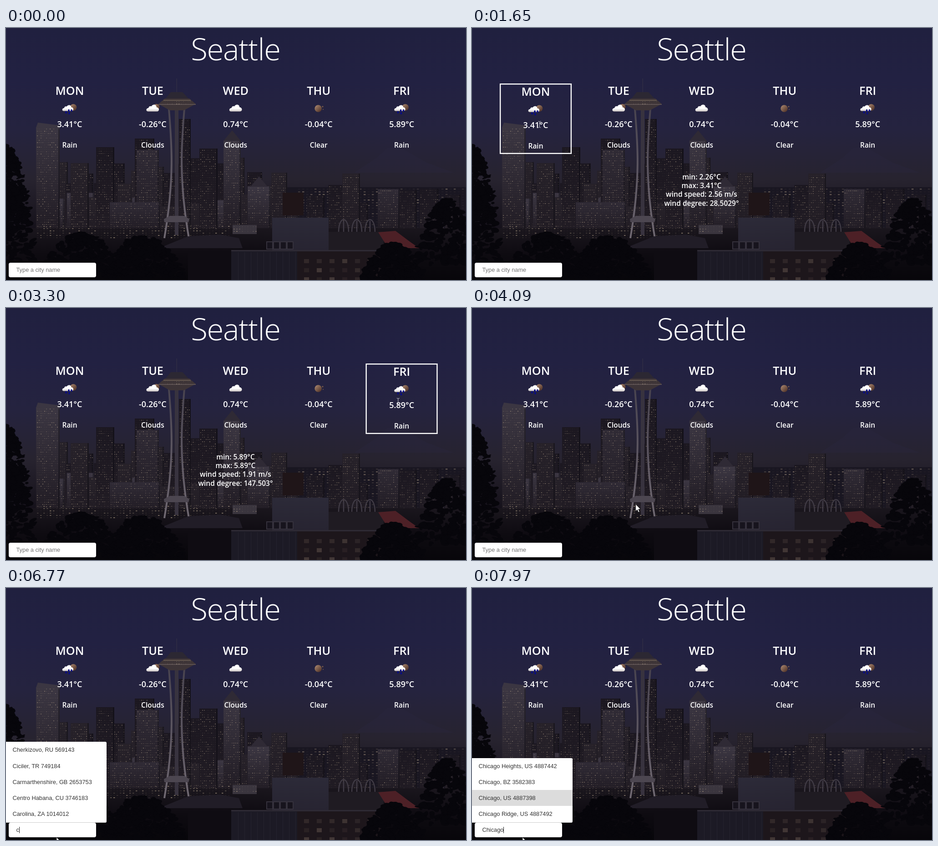
Write an HTML page with a canvas that moves like this. It is 1011 px wide and 554 px high and loops after 8000 ms.

```html
<!DOCTYPE html>
<html lang="en">
<head>
<meta charset="utf-8">
<title>Five day forecast</title>
<style>
html, body { margin: 0; width: 100%; height: 100%; overflow: hidden; background: #1f1f3e; }
#stage { position: relative; width: 1011px; height: 554px; overflow: hidden; }
canvas, svg { position: absolute; left: 0; top: 0; }
svg text { font-family: "Open Sans", "Noto Sans", sans-serif; font-weight: 600; fill: #fff; text-anchor: middle; }
svg .city { font-weight: 300; font-size: 67px; letter-spacing: -1.3px; }
.day { font-size: 25.2px; }
.temp { font-size: 18px; }
.sky, .info { font-size: 15.5px; }
#field, #list { position: absolute; box-sizing: border-box; background: #fff; color: #333;
  font: 12.8px/35.25px "Liberation Sans", Arial, sans-serif; white-space: pre; }
#field { left: 5.5px; top: 515.5px; width: 192px; height: 32px; padding-left: 17px; line-height: 31px; border-radius: 4px; }
#field.empty { color: #757575; }
#caret { position: absolute; width: 1px; height: 14px; top: 9.5px; background: #222; }
#list { left: 0; bottom: 38.5px; min-width: 221px; max-height: 50%; overflow: hidden;
  border-radius: 0 3px 3px 0; border-bottom: 1px solid #ccc; }
#list div { padding: 0 14.5px; height: 35.25px; }
#list .on { background: #dcdcdc; }
</style>
</head>
<body>
<div id="stage">
  <canvas id="photo" width="1011" height="554"></canvas>
  <svg id="ui" width="1011" height="554">
    <defs>
      <linearGradient id="moon" x1="0" y1="0" x2="1" y2="1">
        <stop offset="0" stop-color="#b08d74"/><stop offset="1" stop-color="#46291f"/>
      </linearGradient>
      <linearGradient id="puff" x1="0" y1="0" x2="0" y2="1">
        <stop offset=".55" stop-color="#fff"/><stop offset="1" stop-color="#cfc8c6"/>
      </linearGradient>
      <path id="cloud" fill="url(#puff)" d="M-11 8C-17 8-16 0-10 0C-9-5-5-5-3-4C0-10 9-9 9-2C16-2 17 8 10 8Z"/>
    </defs>
    <text class="city" x="504.5" y="71">Seattle</text>
  </svg>
  <div id="list"></div>
  <div id="field"><span id="value"></span><i id="caret"></i></div>
  <svg width="1011" height="554">
    <path id="arrow" d="M0 0V15.5L3.6 12.2L6 17.8L8.6 16.7L6.2 11.2H11Z" fill="#fff" stroke="#111" stroke-width=".8"/>
    <path id="beam" d="M-3-7Q0-7 0-5.5Q0-7 3-7M0-6V6M-3 7Q0 7 0 5.5Q0 7 3 7" fill="none"/>
  </svg>
</div>
<script>
const LOOP = 8000;
const $ = id => document.getElementById(id);

// ---- city at dusk ----
const g = $('photo').getContext('2d');
let seed = 11;
const rnd = () => (seed = (seed * 16807) % 2147483647) / 2147483647;
const between = (a, b) => a + (b - a) * rnd();
const box = (x, y, w, h, c) => { g.fillStyle = c; g.fillRect(x, y, w, h); };
function poly(c, ...p) {
  g.fillStyle = c;
  g.beginPath();
  for (let i = 0; i < p.length; i += 2) g.lineTo(p[i], p[i + 1]);
  g.fill();
}
function fade(y, h, ...stops) {
  const f = g.createLinearGradient(0, y, 0, y + h);
  stops.forEach((c, i) => f.addColorStop(i / (stops.length - 1), c));
  return f;
}
// mostly dim panes, a few bright ones
function lights(x, y, w, h, dx, dy, rgb = '176,158,134') {
  for (let j = y + 3; j < y + h - 3; j += dy)
    for (let i = x + 2; i < x + w - 2; i += dx)
      box(i, j, dx * .5, dy * .4, `rgba(${rgb},${.03 + .5 * rnd() ** 4})`);
}
const TONES = ['#1b1720', '#262129', '#2f2a35', '#3b3642'];
function tower(x, y, w, tone) {
  const h = 446 - y;
  box(x, y, w, h, fade(y, h, TONES[tone], '#201b23'));
  box(x + w - 3, y, 3, h, 'rgba(8,6,14,.35)');
  lights(x, y, w, h, 4, 5);
}
// leaves gathered below a rounded crown
function tree(cx, top, half, base) {
  g.fillStyle = '#07060b';
  for (let i = 0; i < 320; i++) {
    const v = rnd();
    g.beginPath();
    g.ellipse(cx + between(-half, half) * Math.sqrt(v), top + (base - top) * v, between(3, 11), between(2, 6), between(-.5, .5), 0, 7);
    g.fill();
  }
}

function skyline() {
  for (let x = 105; x < 550; x += between(24, 36)) tower(x, between(285, 345), between(28, 42), 0 | rnd() * 2);
  for (let x = 560; x < 1000; x += between(42, 60)) tower(x, between(345, 385), between(32, 44), 0 | rnd() * 2);
  for (let x = 75; x < 560; x += between(45, 75)) tower(x, between(362, 405), between(40, 62), 1 + 0 | rnd() * 3);
  [[66, 218, 52, 3], [142, 297, 40, 1], [198, 262, 40, 0], [283, 243, 43, 0], [287, 268, 49, 2], [380, 200, 26, 0],
   [425, 265, 40, 0], [478, 247, 38, 3], [531, 348, 50, 3], [583, 318, 35, 1], [739, 320, 39, 1], [817, 354, 48, 2],
   [228, 383, 110, 2]].forEach(t => tower(...t));
  poly(TONES[3], 66, 219, 70, 208, 118, 214, 118, 222);
  for (const [x, y] of [[497, 225], [556, 326]]) poly(TONES[2], x - 19, y + 23, x, y, x + 19, y + 23);
  box(608, 362, 46, 50, '#1f1518');
}

function needle() {
  box(371, 180, 8, 275, '#38333f');
  g.strokeStyle = fade(180, 280, '#49444f', '#5d5762', '#6f6871');
  g.lineWidth = 4;
  for (const s of [-1, 1]) {
    g.beginPath();
    g.moveTo(375 + s * 17, 178);
    g.bezierCurveTo(375 + s * 11, 250, 375 + s * 4, 330, 375 + s * 27, 462);
    g.stroke();
  }
  box(374.5, 111, 1.5, 30, '#302d44');
  poly('#2c2833', 350, 156, 362, 141, 388, 141, 402, 156);
  poly('#3d3437', 335, 167, 349, 155, 403, 155, 417, 167, 391, 181, 360, 181);
  box(346, 158, 60, 2, '#65584f');
  box(335, 167, 82, 2, '#5c5152');
  lights(342, 158, 68, 14, 5, 5);
  poly('#4c4650', 347, 420, 360, 413, 392, 413, 403, 420, 401, 427, 348, 427);
}

function rooftops() {
  box(498, 433, 53, 20, '#3a353e');
  lights(498, 433, 53, 20, 6, 5);
  poly('#211d27', 346, 480, 400, 458, 470, 454, 512, 462, 520, 484, 350, 484);
  g.strokeStyle = '#403b45';
  g.lineWidth = 2.5;
  for (let x = 742; x < 805; x += 29) {
    g.beginPath();
    g.moveTo(x - 11, 449);
    g.bezierCurveTo(x - 11, 412, x + 11, 412, x + 11, 449);
    g.moveTo(x, 449);
    g.lineTo(x, 424);
    g.stroke();
  }
  box(700, 448, 130, 40, '#1f1b22');
  poly('#4d2026', 818, 449, 856, 446, 888, 470, 908, 484, 840, 484);
  box(585, 417, 124, 73, fade(417, 73, '#2c2a38', '#272431'));
  for (let x = 572; x < 630; x += 15) { box(x, 469, 15, 18, '#35313c'); box(x + 2, 471, 11, 14, '#17141d'); }
  box(495, 490, 330, 64, '#1d161b');
  box(495, 490, 145, 64, '#1c1a25');
  for (let x = 510; x < 640; x += 14) box(x, 493, 1, 61, '#25232f');
  box(495, 488, 330, 3, '#2e2a34');
  for (let y = 508; y < 554; y += 20)
    for (let x = 655; x < 820; x += 28) box(x, y, 11, 9, `rgba(150,130,115,${between(.08, .35)})`);
  box(400, 490, 95, 64, '#0f0c12');
}

function paintCity() {
  box(0, 0, 1011, 554, fade(0, 554, '#20203f', '#222142', '#25233f', '#27232f', '#15111a', '#0b080e'));
  poly('rgba(46,41,66,.28)', 765, 318, 815, 285, 838, 264, 862, 260, 890, 276, 925, 296, 985, 318);
  box(560, 350, 451, 100, '#191621');
  lights(640, 350, 371, 95, 9, 6);
  skyline();
  box(0, 440, 1011, 114, fade(440, 114, '#1a161d', '#0e0b11', '#07060a'));
  lights(66, 432, 430, 36, 7, 5, '205,185,155');
  needle();
  rooftops();
  tree(0, 258, 56, 420);
  tree(10, 350, 62, 520);
  tree(165, 452, 95, 540);
  tree(300, 458, 95, 550);
  tree(970, 378, 75, 520);
  tree(850, 475, 75, 560);
}
paintCity();

// ---- forecast ----
const DAYS = [
  ['MON', '3.41', 'Rain', '2.26', '2.56', '28.5029'],
  ['TUE', '-0.26', 'Clouds', '-0.26', '1.17', '36.5012'],
  ['WED', '0.74', 'Clouds', '0.74', '1.22', '58.5031'],
  ['THU', '-0.04', 'Clear', '-0.04', '1.46', '92.5027'],
  ['FRI', '5.89', 'Rain', '5.89', '1.91', '147.503']
];
const midX = i => 140 + 182.4 * i;
const moon = (x, y, r) => `<circle cx="${x}" cy="${y}" r="${r}" fill="url(#moon)"/>`;
const cloud = (x, y, s) => `<use href="#cloud" transform="translate(${x} ${y}) scale(${s})"/>`;
const drop = (x, y) => `<path d="M${x} ${y}q4 5 0 6q-4-1 0-6" fill="#080c86"/>`;
const ICONS = {
  Rain: moon(8, 174.5, 7.3) + cloud(-4, 176, .82) + drop(-8, 182) + drop(-2, 178) + drop(4, 178) + drop(-1, 184),
  Clouds: cloud(0, 176, .93),
  Clear: moon(-1, 177, 7.8) + moon(9, 173, 1.6) + moon(10, 179, 1)
};
const ui = $('ui');
ui.innerHTML += DAYS.map(([day, temp, sky], i) => `<g transform="translate(${midX(i)} 0)">
  <rect x="-77.9" y="123.2" width="155.8" height="152.6" fill="none" stroke="#fff" stroke-width="2.4"/>
  <g><text class="day" y="147">${day}</text>${day === 'TUE' ? moon(8.5, 173.5, 6.6) : ''}${ICONS[sky]}
  <text class="temp" y="217.5">${temp}°C</text><text class="sky" y="262.5">${sky}</text></g></g>`).join('') +
  [0, 1, 2, 3].map(i => `<text class="info" x="504.5" y="${333 + 19.2 * i}"></text>`).join('');
const cards = [...ui.querySelectorAll(':scope > g')];
const info = [...ui.querySelectorAll('.info')];

// ---- pointer: time, x, y ----
const PATH = [
  [210, 924, 546], [1000, 407, 263], [1650, 148, 212], [1830, 225, 216], [2710, 586, 202], [3300, 862, 205],
  [3640, 800, 290], [4320, 136, 503], [4500, 119, 524], [4640, 119, 524], [5010, 111, 548], [LOOP, 111, 548]
];
function pointer(t) {
  const k = PATH.findIndex(p => p[0] > t);
  if (k < 1) return null;
  const [t0, x0, y0] = PATH[k - 1], [t1, x1, y1] = PATH[k], u = (t - t0) / (t1 - t0);
  return [x0 + (x1 - x0) * u, y0 + (y1 - y0) * u];
}
const within = (v, a, b) => v >= a && v <= b;

// ---- search: time, value, rows, chosen row ----
const CHICAGO = ['Chicago Heights, US 4887442', 'Chicago, BZ 3582383', 'Chicago, US 4887398', 'Chicago Ridge, US 4887492'];
const C_ROWS = ['Cherkizovo, RU 569143', 'Ciciler, TR 749184', 'Carmarthenshire, GB 2653753',
  'Centro Habana, CU 3746183', 'Carolina, ZA 1014012'];
const CH_ROWS = ['Cherkizovo, RU 569143', 'Chernivtsi, UA 710719', 'Chiang Mai, TH 1153671', 'Chester, GB 2653228',
  'Chillicothe, US 4508204', 'Chittagong Hill Tracts and the Surrounding Coastal District, BD 1205733',
  'Chiba, JP 2113015', 'Chieti, IT 3178796'];
const typed = [...'chicago'].map((c, i) =>
  [6770 + 85 * i, 'chicago'.slice(0, i + 1), i < 1 ? C_ROWS : i < 3 ? CH_ROWS : CHICAGO]);
const STEPS = [[0, '', []], [6720, 'c', []], ...typed, [7830, 'Chicago Ridge', CHICAGO, 3], [7970, 'Chicago', CHICAGO, 2]];
let shown = -1;
function search(t) {
  const k = STEPS.filter(s => s[0] <= t).length - 1;
  if (k !== shown) {
    shown = k;
    const [, text, rows, chosen] = STEPS[k];
    $('value').textContent = text || 'Type a city name';
    $('field').className = text ? '' : 'empty';
    $('list').style.display = rows.length ? 'block' : 'none';
    $('list').innerHTML = rows.map((r, i) => `<div${i === chosen ? ' class="on"' : ''}>${r}</div>`).join('');
    $('caret').style.left = 17 + (text ? $('value').getBoundingClientRect().width : 0) + 'px';
  }
  const lit = within(t, 4640, 5149) || within(t, 5660, 6209) || t >= 6720;
  $('caret').style.visibility = lit ? 'visible' : 'hidden';
}

function draw(t) {
  const at = pointer(t), [x, y] = at || [-99, -99];
  const hot = DAYS.findIndex((d, i) => within(x - midX(i), -79, 82.5) && within(y, 122, 277));
  cards.forEach((c, i) => {
    c.firstElementChild.style.display = i === hot ? '' : 'none';
    c.lastElementChild.setAttribute('transform', `translate(0 ${i === hot ? 2.2 : 0})`);
  });
  const [, max, , min, speed, degree] = DAYS[hot] || [];
  const lines = hot < 0 ? [] : [`min: ${min}°C`, `max: ${max}°C`, `wind speed: ${speed} m/s`, `wind degree: ${degree}°`];
  info.forEach((el, i) => el.textContent = lines[i] || '');

  const inField = within(x, 6, 197) && within(y, 516, 547);
  const onText = hot >= 0 && Math.abs(x - midX(hot)) < 28 &&
    (within(y, 128, 152) || within(y, 203, 223) || within(y, 250, 267));
  const beam = inField || onText;
  $('arrow').style.display = at && !beam ? '' : 'none';
  $('beam').style.display = at && beam ? '' : 'none';
  $('beam').setAttribute('stroke', inField ? '#222' : '#c8c8d0');
  for (const id of ['arrow', 'beam']) $(id).setAttribute('transform', `translate(${x} ${y})`);
  search(t);
}

const start = performance.now();
function tick() {
  draw((performance.now() - start) % LOOP);
  requestAnimationFrame(tick);
}
tick();
</script>
</body>
</html>
```
